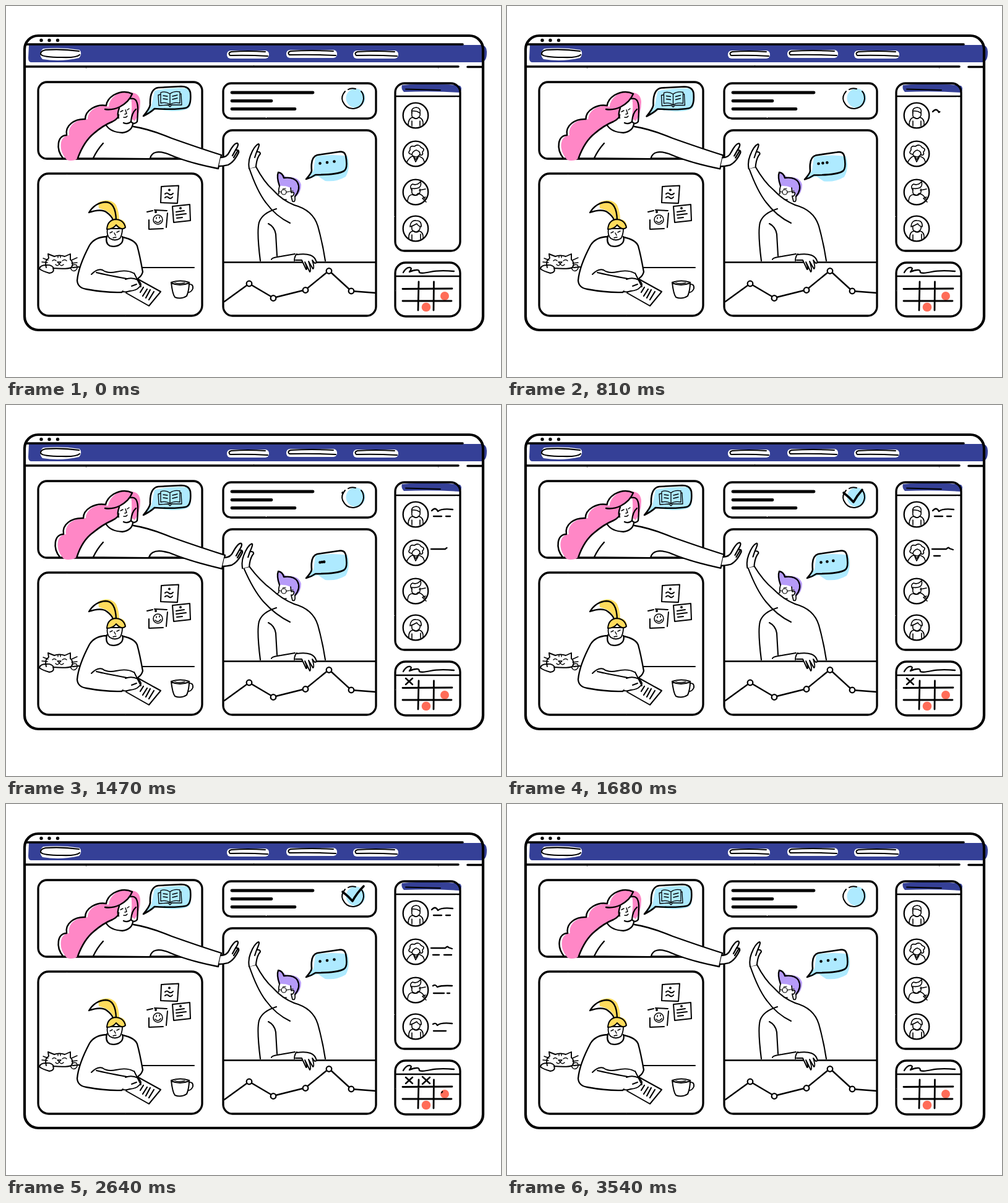
An HTML page that plays this animation: 800 px wide and 600 px high, repeating every 3570 ms.

```html
<!DOCTYPE html>
<html lang="en">
<head>
<meta charset="utf-8">
<title>Working together online</title>
<style>
  html, body { margin: 0; width: 100%; height: 100%; overflow: hidden; background: #fff; }
  svg {
    display: block; width: 800px; height: 600px;
    fill: none; stroke: #000; stroke-width: 2.3; stroke-linecap: round; stroke-linejoin: round;
  }
  .frame { stroke-width: 3.3; }
  .thin { stroke-width: 1.6; }
  .white { fill: #fff; }
  .dot, .blue, .cyan, .pink, .violet, .yellow, .red, .plain { stroke: none; }
  .dot { fill: #000; }
  .blue { fill: #354097; }
  .cyan { fill: #aeeaff; }
  .pink { fill: #ff87c6; }
  .violet { fill: #b69bf8; }
  .yellow { fill: #ffdc5c; }
  .red { fill: #ff6c58; }
  .plain { fill: #fff; }
</style>
</head>
<body>
<svg viewBox="0 0 800 600">
  <defs>
    <filter id="rough" filterUnits="userSpaceOnUse" x="0" y="0" width="800" height="600" color-interpolation-filters="sRGB">
      <feTurbulence type="fractalNoise" baseFrequency=".45" numOctaves="1" seed="4"/>
      <feDisplacementMap in="SourceGraphic" scale="1.6" xChannelSelector="R" yChannelSelector="G"/>
    </filter>
  </defs>

  <!-- window, panels and their fixed contents -->
  <g class="frame" filter="url(#rough)">
    <path class="blue" d="M37 63H768Q778 64 777 76Q777 90 768 91H40Q36 90 36 84Z"/>
    <rect x="30" y="48" width="741" height="476" rx="22" stroke-width="4.2"/>
    <path d="M33 62H738M32 98H731M746 98.500H770" stroke-width="3.6"/>
    <path class="plain" d="M60 69Q90 66 119 71Q124 77 118 84Q88 91 59 86Q51 77 60 69Z"/>
    <path d="M118 73Q90 69 64 71Q55 73 56 78Q59 83 90 83Q113 84 119 79" stroke-width="2.2"/>
    <g id="nav"></g>
    <rect x="52" y="123" width="265" height="124" rx="14"/>
    <rect x="351" y="125" width="247" height="57" rx="13"/>
    <rect x="351" y="201" width="247" height="300" rx="15"/>
    <rect x="52" y="271" width="265" height="230" rx="17"/>
    <path class="blue" d="M640 128Q690 123 734 129Q738 134 734 140Q690 137 643 139Q638 134 640 128Z"/>
    <rect x="629" y="125" width="105" height="271" rx="15"/>
    <path d="M646 134.500L702 136" stroke-width="1.8"/>
    <path d="M631 146H733" stroke-width="2.5"/>
    <rect x="629" y="415" width="105" height="87" rx="17"/>
    <path d="M631 437H733" stroke-width="2.5"/>
    <path d="M365 140H496M365 153.500H429M365 166.500H467" stroke-width="4.8"/>
  </g>
  <circle class="dot" cx="57" cy="55.500" r="2.7"/><circle class="dot" cx="70" cy="55.500" r="2.7"/><circle class="dot" cx="83.500" cy="55.500" r="2.7"/>

  <!-- progress ring -->
  <circle class="cyan" cx="565" cy="149" r="15.500"/>
  <path d="M548 138Q541 146 544 154Q550 167 562 166Q576 164 578 150Q578 142 574 138M553 135Q558 132 565 134" stroke-width="2"/>

  <!-- calendar -->
  <circle class="red" cx="709" cy="469" r="7"/><circle class="red" cx="679" cy="487" r="7.300"/>
  <path d="M642 431Q647 422 653 423Q657 424 652 430Q659 427 663 427Q668 426 668 431Q672 433 686 430T724 429"/>
  <path d="M641 457.500L721 457M641 477L720 477M667 446L666 492M691.500 446L691 492" stroke-width="2.800"/>

  <!-- contacts -->
  <g id="people"></g>

  <!-- table and chart -->
  <path d="M352 414.500L597 414.500" stroke-width="2.500"/>
  <path d="M353 478L393 449L432 472L484 459L522 428L558 461L597 464" stroke-width="2.400"/>
  <g id="marks"></g>

  <!-- notes on the wall -->
  <g stroke-width="2">
    <path d="M251 292L279 290.500L277 319L250 318ZM257 304Q260 301 263 304T270 303M257 310Q260 307 263 310T269 309"/>
    <path d="M237 331L228 333M240 330L260 331M261 335L259 358M254 360L231 361L231 346"/>
    <circle cx="245.500" cy="345.500" r="7.500" stroke-width="1.600"/>
    <path d="M241 348Q246 353 250 347M243 342V344M248 341V343" stroke-width="1.600"/>
    <path d="M269 324L297 321L298 347L271 350ZM275 333L288 331M275 338L291 336M276 343L285 342"/>
    <circle class="dot" cx="264" cy="297.500" r="2"/><circle class="dot" cx="242" cy="333" r="2"/><circle class="dot" cx="282" cy="327" r="2"/>
  </g>

  <!-- writer at the desk -->
  <path d="M220 423L304 423M54 425L58 425M108 423L118 422" stroke-width="2"/>
  <g id="cat" stroke-width="1.900">
    <path class="white" d="M65 423Q62 411 69 408L68 401L78 405Q86 402 95 405L104 401L104 410Q110 415 106 423Q98 426 76 424Q79 431 70 432Q59 429 54 425Q55 419 65 419Q74 418 77 424"/>
    <path d="M75 412Q78 409 81 412M91 412Q95 409 98 412M83 414H89L86 417ZM80 418Q84 422 86 417Q89 422 93 418M60 408L68 411M58 414L67 415M106 411L115 407M106 416L115 415M104 423Q106 430 112 428Q117 424 114 419Q109 417 106 421M84 404V407M88 404V407" stroke-width="1.400"/>
  </g>
  <path class="yellow" d="M149 318Q168 309 178 322Q183 334 183 345Q192 345 194 356Q191 362 185 360L172 353L163 361Q165 348 174 345Q169 331 150 327Z"/>
  <path d="M178 346Q177 317 161 317Q144 318 134 334Q154 327 163 334Q171 340 173 346"/>
  <path class="white" d="M164 360Q162 371 168 376Q176 381 184 376Q188 370 188 360Z" stroke-width="1.800"/>
  <path class="yellow" d="M163 361Q165 347 177 345Q191 345 193 358Q187 363 178 354Q173 361 163 361Z"/>
  <path d="M163 361Q164 347 176 345Q190 345 193 358Q187 364 178 354Q173 361 163 361" stroke-width="2"/>
  <path d="M168 367L172 365M179 366L183 364M175 367L177 371M173 375Q176 374 178 374" stroke-width="1.400"/>
  <path d="M163 372Q160 384 168 388Q180 391 187 383Q190 378 188 373M162 373Q143 374 135 387Q117 421 115 444Q116 456 130 458Q162 464 187 463L193 458M189 374Q208 378 212 388Q216 402 221 430Q219 437 214 440"/>
  <path d="M138 434Q148 424 156 427Q164 433 178 430Q195 426 206 432M146 431Q162 435 195 441" stroke-width="1.900"/>
  <path class="white" d="M194 464L212 441L250 462L231 485Z" stroke-width="2"/>
  <path d="M222 455L217 463M228 458L221 469M233 459L226 472M239 462L231 475" stroke-width="2.200"/>
  <path class="white" d="M193 442Q203 438 213 443Q222 451 215 455Q211 460 200 461Q194 463 189 462" stroke-width="1.900"/>
  <path d="M207 432L218 454M203 453L211 450" stroke-width="1.900"/>
  <path class="white" d="M295 450Q303 449 302 457Q299 464 293 463" stroke-width="1.900"/>
  <path class="white" d="M267 447Q269 466 273 471Q283 475 292 469Q296 460 296 447Q282 442 267 447ZM267 448Q281 454 296 448" stroke-width="2"/>
  <path d="M273 447.500Q280 450 289 447.500" stroke-width="1.300"/>

  <!-- long-haired speaker -->
  <path id="armFill" class="plain"/>
  <path id="hairFill" class="pink"/>
  <path class="pink" d="M199 140Q216 139 217 155Q217 174 208 186L201 181Q205 165 202 148Z"/>
  <path class="plain" d="M184 163Q179 174 183 187Q192 193 202 186Q203 162 201 149Q195 157 184 163Z"/>
  <path class="plain" d="M163 193Q172 205 190 205Q202 202 205 193L196 187L182 188Z"/>
  <path id="hairLine" stroke-width="2.500"/>
  <path d="M204 142Q199 155 184 163Q172 169 160 167M201 150Q212 147 213 164Q213 178 212 187Q207 193 202 187Q203 173 210 167M183 165Q179 176 182 181M202 187Q197 192 190 189M162 193Q169 204 188 205Q203 203 205 191M157 222Q147 233 141 246"/>
  <path d="M185 171L189 169M196 168L199 166M193 168L195 174L192 175M190 180Q194 181 196 178" stroke-width="1.400"/>
  <path id="armLine"/>
  <path id="palm1" class="white" d="M347 245Q357 245 361 236Q369 221 374 222Q377 224 371 233Q377 232 376 237Q369 252 359 257Q350 259 344 259M371 233L366 242M374 235L368 245"/>

  <!-- speaker at the table -->
  <path class="violet" d="M440 270Q448 271 453 277Q473 275 477 289Q477 302 468 309L460 294Q451 290 441 291Q435 277 440 270Z"/>
  <path d="M442 291Q437 276 440 269Q447 270 449 278Q465 276 471 285Q477 296 467 308"/>
  <path d="M442 291Q440 297 441 303L438 306L442 309Q444 315 453 313M460 294L461 302Q467 300 465 305Q463 309 461 307M461 308L463 316Q468 318 467 309" stroke-width="1.700"/>
  <circle cx="449" cy="301" r="4" stroke-width="1.200"/>
  <path d="M453 301L464 299M445 301L441 300M447 296L452 295" stroke-width="1.200"/>
  <path id="reachFill" class="plain"/>
  <path d="M437 328Q414 335 409 350Q405 365 411 412M424 352Q434 357 436 369L438 404M466 322Q496 330 504 356Q512 385 516 412" stroke-width="2.100"/>
  <path d="M429 410Q429 407 444 405L467 401M470 401Q466 405 466 412" stroke-width="1.900"/>
  <path class="white" d="M470 402Q484 400 492 403Q500 406 502 415L499 416L495 411Q499 424 496 425L489 413Q494 428 491 430L483 414Q488 427 485 426L478 411L468 411" stroke-width="1.900"/>
  <path id="reachLine" stroke-width="2.100"/>
  <path id="palm2" class="white" d="M393 263Q391 252 395 242Q401 226 408 223Q411 223 405 236Q411 235 411 239Q405 246 404 260M405 236L402 245" stroke-width="2.100"/>

  <!-- speech bubbles -->
  <g id="bubble1" stroke-width="2.600">
    <path class="cyan" d="M240 137Q270 131 293 133Q301 142 298 161Q296 170 268 170L242 167L223 178L235 162Z"/>
    <path d="M246 132L283 130Q296 130 298 140Q300 163 290 165Q275 168 240 166Q234 172 222 178Q232 166 233 160Q232 134 246 132"/>
    <path d="M265 142Q257 137 250 140V157Q260 155 265 160Q270 155 281 157V139Q272 137 265 142V160M250 143L246 144L247 161L262 160L265 163L268 160L284 160L283 142L281 142M254 145L261 146M254 150L261 151M269 146L277 144M269 151L277 149" stroke-width="1.300"/>
  </g>
  <g id="bubble2" stroke-width="2.600">
    <path class="cyan" d="M500 243Q530 239 552 243Q557 262 549 276Q534 285 516 283L504 275L486 280L497 266Z"/>
    <path d="M503 241L537 236Q547 234 549 242Q553 263 546 267Q535 273 500 273Q493 278 485 280Q494 270 494 266Q492 244 503 241"/>
    <g id="dots"><circle class="dot" cy="254.500" r="2.300"/><circle class="dot" cy="253" r="2.300"/><circle class="dot" cy="251.500" r="2.300"/></g>
  </g>
  <g id="ink"></g>
</svg>

<script>
const LOOP = 3570;
const $ = id => document.getElementById(id);
const add = (parent, tag, attrs) => {
  const node = document.createElementNS('http://www.w3.org/2000/svg', tag);
  for (const key in attrs) node.setAttribute(key, attrs[key]);
  return parent.appendChild(node);
};
const clamp = v => Math.max(0, Math.min(1, v));
const smooth = v => v * v * (3 - 2 * v);

// eased value from [time, value] steps
function track(steps, t) {
  const i = steps.findIndex(s => s[0] > t);
  if (i < 0) return steps[steps.length - 1][1];
  const [t0, a] = steps[i - 1], [t1, b] = steps[i];
  return a + (b - a) * smooth((t - t0) / (t1 - t0));
}

// navigation pills
for (const [x, y, w] of [[357, 72, 68], [453, 71, 82], [561, 72, 73]]) {
  add($('nav'), 'rect', { x, y, width: w, height: 13, rx: 6, class: 'plain' });
  add($('nav'), 'path', {
    d: `M${x + w - 6} ${y + 2}Q${x + w / 2} ${y} ${x + 7} ${y + 2}Q${x + 1} ${y + 4} ${x + 5} ${y + 8}Q${x + w / 2} ${y + 7} ${x + w - 2} ${y + 9}`,
    'stroke-width': 2
  });
}

// chart points
for (const [cx, cy] of [[393, 449], [432, 472.5], [484, 459.5], [522, 428.5], [558, 461]])
  add($('marks'), 'circle', { cx, cy, r: 4.3, class: 'white' });

// contact portraits, drawn around their own centre
const hairCuts = [
  'M-6 -4Q-8 -12 1 -13Q9 -12 7 -4Q1 -8 -6 -7',
  'M-6 1Q-14 0 -9 -6Q-10 -14 -2 -12Q5 -17 9 -10Q16 -8 11 -3Q13 3 7 2Q8 -4 1 -6Q-5 -4 -6 1',
  'M-6 -3Q-11 -10 -5 -13Q2 -10 8 -17Q10 -10 5 -7Q0 -5 -6 -6',
  'M-9 -3Q-8 -14 1 -13Q10 -13 9 -3Q4 -4 2 -8Q-3 -5 -9 -3'
];
const shoulders = [
  'M-12 16Q-12 4 -4 3Q1 7 5 3Q13 5 12 15M-6 9V17M7 9V17',
  'M-14 13Q-9 4 -4 4L0 9L5 4Q13 6 14 13M-3 6L0 13L4 6',
  'M-13 14Q-12 4 -5 4Q0 7 4 2Q11 4 15 11M6 -3L16 -5M16 8L11 10L17 16',
  'M-11 17Q-12 5 -4 4Q1 8 6 4Q13 6 12 16M-6 10V18M8 9V17'
];
[177, 239, 301, 360].forEach((y, i) => {
  const g = add($('people'), 'g', { transform: `translate(662 ${y})`, 'stroke-width': 1.6 });
  add(g, 'circle', { r: 20.3, 'stroke-width': 2.3 });
  add(g, 'path', { d: 'M-6 -5Q-7 4 -3 4Q1 7 5 3Q8 1 7 -5' });
  add(g, 'path', { d: hairCuts[i], class: 'white' });
  add(g, 'path', { d: shoulders[i] });
});

// strokes that write themselves: path, start, end, width
const ink = [
  ['M688 171Q694 164 698 172Q704 167 722 169', 700, 960, 2.3],
  ['M691 180H704', 980, 1080, 2.3], ['M711 180H718', 1100, 1170, 2.3],
  ['M687 233H710Q714 229 715 232L721 234', 1300, 1560, 2.3],
  ['M690 244H700', 1580, 1660, 2.3], ['M708 244H720', 1680, 1770, 2.3],
  ['M690 294Q694 291 697 296Q704 293 721 294', 1790, 1980, 2.3],
  ['M691 306H708', 1990, 2070, 2.3], ['M713 306H717', 2090, 2140, 2.3],
  ['M690 356Q695 353 697 358Q703 353 721 355', 2360, 2560, 2.3],
  ['M691 367H711', 2570, 2640, 2.3],
  ['M646 442L657 452', 1065, 1220, 2.5], ['M657 442L646 452', 1290, 1430, 2.5],
  ['M673 441L685 452', 1830, 1980, 2.5], ['M673 453L685 442', 2010, 2130, 2.5],
  ['M704 467Q707 462 712 464Q717 470 711 474Q703 475 704 467', 2600, 2860, 2],
  ['M673 486Q676 481 681 482Q687 488 681 493Q673 494 673 486', 2840, 3060, 2],
  ['M544 142Q553 149 560 157Q567 144 578 133', 1455, 1740, 3.6]
].map(([d, start, end, width]) => ({
  start, end, node: add($('ink'), 'path', { d, pathLength: 1, 'stroke-width': width })
}));

const hairSteps = [[0, 0], [540, -20], [810, -1], [1130, -11], [1230, -8], [1470, -5], [1850, 0]];
const clapSteps = [[0, 0], [540, 1.1], [810, .13], [1140, 1.08], [1230, 1], [1470, .6], [1850, 0]];
const swaySteps = [[0, 0], [640, 1], [1250, 1], [1460, 0]];
const dotSteps = [[0, 11.5], [560, 11.5], [1140, 0], [1290, 0], [1800, 11.5]];

function poseHair(s) {
  const h = s * .6, k = s * .2;
  // three locks hanging from the crown
  const locks = dx => {
    const crown = `${162 + k + dx} ${161 + dx / 2}`;
    return `${crown}C${147 + h + dx} 158 ${128 + h + dx} 168 ${128 + h + dx} 183C${111 + s + dx} 182 ${95 + s + dx} 193 ${98 + s + dx} 209C${83 + s + dx} 209 ${80 + s + dx} 231 ${92 + s + dx} 246`;
  };
  const inner = `${116 + s * .3} 246Q${126 + h} 219 ${142 + k} 206Q157 193 ${172 + k} 187Q182 182 182 176`;
  $('hairLine').setAttribute('d', `M204 142Q190 135 174 144Q163 151 ${locks(0)}M${inner}`);
  $('hairFill').setAttribute('d',
    `M206 141Q190 135 177 144Q166 153 ${locks(4)}Q${99 + s} 252 ${112 + s * .6} 249L${inner}L184 163Q199 155 206 141Z`);
}

function poseArms(c) {
  const x = 10 * c, y = 3 * c;
  const top = `M206 195Q232 199 268 214Q316 231 ${348 + x} ${241 + y}`;
  const end = `L${343 + x} ${263 + y}`;
  const under = `Q${292 + x} 253 ${261 + x / 2} 239Q${237 - c} 231 ${233 - 3 * c} 246`;
  $('armLine').setAttribute('d', top + end + under);
  $('armFill').setAttribute('d', top + end + under + 'L157 245L160 207L180 195Z');
  $('palm1').setAttribute('transform', `translate(${x} ${y})`);

  const u = -20 * c, v = 2 * c;
  const low = `M${393 + u * .75} ${262 + v}Q${406 + u / 2} 300 ${420 + u / 3} 318Q436 340 459 351`;
  const high = `M${404 + u * .9} ${260 + v}Q${417 + u / 2} 285 ${432 + u / 4} 298Q446 314 466 322`;
  $('reachLine').setAttribute('d', `${low}${high}M${393 + u * .75} ${262 + v}L${404 + u * .9} ${260 + v}`);
  $('reachFill').setAttribute('d', `${low}L466 322Q446 314 ${432 + u / 4} 298Q${417 + u / 2} 285 ${404 + u * .9} ${260 + v}Z`);
  $('palm2').setAttribute('transform', `translate(${u * .9} ${v})`);
}

function draw(t) {
  poseHair(track(hairSteps, t));
  poseArms(track(clapSteps, t));

  const sway = track(swaySteps, t);
  $('bubble1').setAttribute('transform', `translate(${3.5 * sway} ${.5 * sway})`);
  $('bubble2').setAttribute('transform', `translate(${-4 * sway} ${.5 * sway})`);

  const gap = track(dotSteps, t);
  [...$('dots').children].forEach((dot, i) => {
    dot.setAttribute('cx', 507.5 + i * gap);
    dot.setAttribute('cy', 254.5 - i * gap * .13);
  });

  const nap = t > 2200 && t < 3520 ? Math.sin((t - 2200) / 1320 * Math.PI * 3) : 0;
  $('cat').setAttribute('transform', `translate(0 ${-.9 * nap * nap})`);

  const left = 1 - smooth(clamp((t - 3080) / 430));
  for (const { node, start, end } of ink) {
    const p = smooth(clamp((t - start) / (end - start))) * left;
    node.style.display = p > .001 ? '' : 'none';
    node.setAttribute('stroke-dasharray', `${p} 2`);
  }
}

const began = performance.now();
function tick() {
  draw((performance.now() - began) % LOOP);
  requestAnimationFrame(tick);
}
tick();
</script>
</body>
</html>
```
